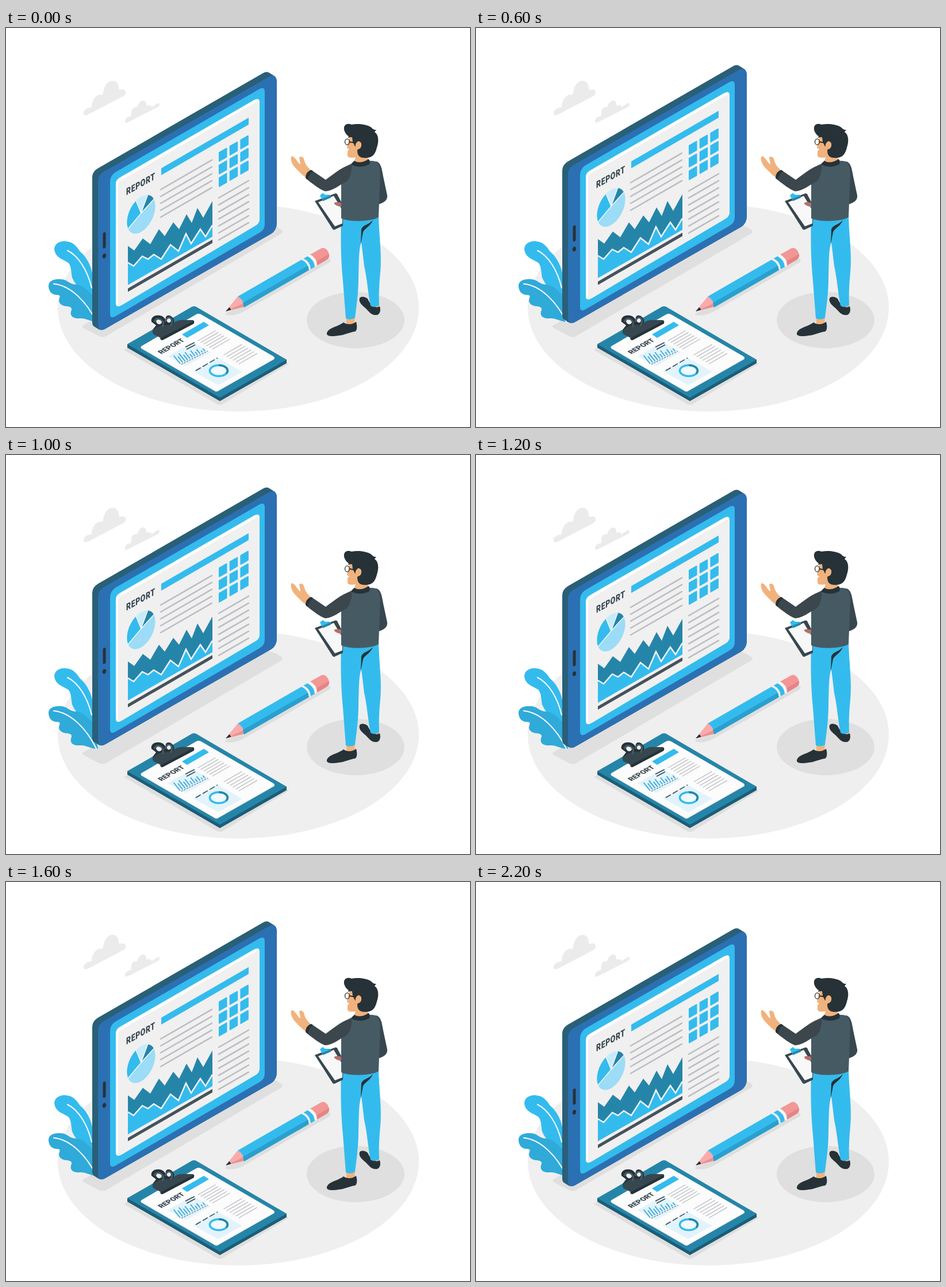
An HTML page that plays this animation: 807x694 px, repeating every 2.4 s.

```html
<!DOCTYPE html>
<html lang="en">
<head>
<meta charset="utf-8">
<title>Report</title>
<style>
html, body { margin: 0; width: 100%; height: 100%; overflow: hidden; background: #fff; }
svg { display: block; width: 807px; height: 694px; }
text { font-family: Roboto, Inter, sans-serif; font-weight: 900; fill: #37474f; }
.cyan { fill: #34bbed; }
.teal { fill: #2585a9; }
.dark { fill: #263238; }
.slate { fill: #37474f; }
.skin { fill: #f1b27d; }
.rule { fill: none; stroke: #babcc1; stroke-linecap: round; }
</style>
</head>
<body>
<svg viewBox="0 0 807 694">
  <g fill="#ebebeb">
    <path d="M137 152C133 149 135 143 141 140C145 137 148 140 149 137C149 126 157 115 165 116Q168 117 169 113C170 103 175 94 183 92C191 91 196 96 196 104Q196 109 200 107C206 106 209 109 208 114Q207 117 203 119L142 151Z"/>
    <path d="M208 165C205 161 209 155 214 154C219 154 217 151 218 147C218 141 222 137 228 138C230 130 235 126 239 126C245 127 243 133 245 135C250 133 253 135 253 138L263 131C267 129 269 133 265 137L212 164Z"/>
  </g>
  <ellipse cx="404" cy="486.500" rx="314" ry="180.500" fill="#efefef"/>
  <path d="M135 517L150 508L440 335L471 346L480 352Q483 355 478 358L174 536Q168 539 162 536L135 522Q131 519 135 517Z" fill="#dfdfdf"/>

  <path class="cyan" d="M84 384C85 375 94 370 104 371C117 372 122 379 129 389C142 400 149 416 151 432V478C139 464 122 451 115 434C113 424 114 414 108 408C98 402 85 399 84 384Z"/>
  <path d="M74 450C73 440 84 436 95 437C106 437 110 445 119 446C136 446 143 459 152 466L160 511C148 512 140 504 129 505C117 506 111 501 113 493C116 487 113 485 106 484C95 483 90 477 93 470C95 464 93 465 86 464C79 463 75 458 74 450Z" fill="#30aad9"/>
  <g fill="none" stroke="#fff" stroke-width="2" stroke-linecap="round">
    <path d="M107 387C125 396 141 419 149 452"/>
    <path d="M83 445C113 448 141 477 157 511"/>
  </g>

  <g id="tablet">
    <path d="M150 260Q150 250 160 244L447 78.500Q453 75 458 78L466 83Q471 86 471 95V338Q471 352 461 358L173 523Q167 527 161 524L153 519Q150 517 150 512Z" fill="#2a5f78"/>
    <path d="M160 266Q160 256 170 250L457 85Q471 78 471 96V338Q471 352 461 358L173 523Q160 530 160 515Z" fill="#2b70b2"/>
    <path class="cyan" d="M181 268Q181 257 190 251L440 106.500Q450 101 450 111V341Q450 351 441 356L191 501Q181 507 181 497Z"/>
    <path d="M191 271Q191 264 198 260L431 125.500Q441 120 441 129V332Q441 339 435 343L201 482Q191 488 191 478Z" fill="#fff"/>
    <path d="M195 274Q195 268 200 265L434 129.500Q441 126 441 133V332Q441 339 435 343L202 481.500Q195 485 195 479Z" fill="#f0f0f0"/>
    <rect class="dark" x="168.500" y="355" width="5" height="28" rx="2.500" transform="matrix(1 -.25 0 1 0 43)"/>
    <ellipse class="dark" cx="171" cy="396.500" rx="3" ry="4.200" transform="rotate(18 171 396.500)"/>
    <text transform="matrix(.75 -.42 0 1 209 291)" font-size="16.500" letter-spacing=".8">REPORT</text>
    <path class="cyan" d="M270 244L422 156V168L270 256Z"/>
    <clipPath id="disc"><circle r="29" transform="matrix(.85 -.49 0 1.06 235 324)"/></clipPath>
    <g clip-path="url(#disc)" stroke="#f4f8fa" stroke-width="1.200">
      <path d="M235 322L205 358L280 380V280L263 291Z" fill="#9cdcf6"/>
      <path class="cyan" d="M235 322L221 288L190 290V380L205 358Z"/>
      <path d="M235 322L221 288L246 280L249 284Z" fill="#c6ebfa"/>
      <path class="teal" d="M235 322L249 284H270L263 291Z"/>
    </g>
    <path id="notes" class="rule" stroke-width="2.500"/>
    <path id="grid" class="cyan" stroke="#34bbed" stroke-width="2" stroke-linejoin="round"/>
    <path class="teal" d="M212 379L223 387L238 366L251 376L266 350L276 362L291 338L301 350L314 324L323 339L333 313L343 330L359 301V362L212 446Z"/>
    <path class="cyan" d="M212 408L222 414L237 397L247 402L257 394L270 402L286 377L300 388L313 358L322 375L338 350L347 363L359 343V363L212 447Z"/>
    <path d="M212 408L222 414L237 397L247 402L257 394L270 402L286 377L300 388L313 358L322 375L338 350L347 363L359 343" fill="none" stroke="#f2f5f6" stroke-width="2.500"/>
    <path d="M212 453L359 368V374L212 459Z" fill="#46525c"/>
  </g>

  <g>
    <path d="M382 499Q379 496 389 493L555 399Q570 402 562 408L412 494Q396 502 382 499Z" fill="#dedede"/>
    <path d="M382 493L403 467Q414 471 414 484Z" fill="#f9abab"/>
    <path d="M382 493L413 479L414 485Z" fill="#ec8f90"/>
    <path class="dark" d="M382 493L388 486Q391 487 391 490.500Z"/>
    <path class="cyan" d="M403 467L514 403Q526 408 527 421L414 486Q414 472 403 467Z"/>
    <path d="M412 478L526 413L527 421L414 486Z" fill="#2b9fcd"/>
    <path d="M514 403L529 394Q541 400 541 413L527 421Q526 408 514 403Z" fill="#f5f5f5"/>
    <path d="M517.500 401L524.500 397Q536 403 537 415.500L530 419.500Q529 406 517.500 401Z" fill="#34bbed"/>
    <path d="M529 394L547 384Q553 380 559 387Q565 396 558 403L541 413Q541 400 529 394Z" fill="#f29795"/>
    <path d="M541 405L562 393Q563 400 558 403L541 413Z" fill="#e78483"/>
  </g>

  <g>
    <path d="M205 560L327 490L492 584L377 654Q372 657 367 654Z" fill="#dedede"/>
    <path d="M211 550L327 486L488 577V583L372 649L211 556Z" fill="#1c5d77"/>
    <path class="teal" d="M211 550L323 485Q327 483 331 485L488 577L372 643Z"/>
    <path d="M236 554L331 499Q335 497 339 499L465 572Q469 575 465 577L370 631Q366 634 362 631L236 558Q233 556 236 554Z" fill="#dedfe0"/>
    <path d="M236 553L331 498Q335 496 339 498L465 571Q469 574 465 576L370 630Q366 633 362 630L236 557Q233 555 236 553Z" fill="#fcfcfc"/>
    <text transform="matrix(.866 -.5 .866 .5 270.500 567.500)" font-size="12.500">REPORT</text>
    <path class="cyan" d="M306 533L344 511L353 517L315 539Z"/>
    <path id="memo" class="rule" stroke-width="1.300"/>
    <path d="M281 571L325 546L356 564L313 588ZM325 597L367 573L411 598L369 621Z" fill="#e2f3fb"/>
    <path id="bars" fill="none" stroke="#34a9d9" stroke-width="1.800"/>
    <path d="M305 585L351 562" fill="none" stroke="#37474f" stroke-width="1" stroke-dasharray="3 2"/>
    <path d="M312 555L328 547M314 559L329 551" stroke="#37474f" stroke-width="1.500"/>
    <path d="M330 596L368 574" stroke="#37474f" stroke-width="1.500" stroke-dasharray="10 4"/>
    <ellipse cx="370" cy="596" rx="15.500" ry="9.500" fill="#f0f9fd" stroke="#34bbed" stroke-width="3.600"/>
    <path d="M370 586.500A15.500 9.500 0 0 1 383 601" fill="none" stroke="#2585a9" stroke-width="3.600"/>
    <path class="dark" d="M256 532C253 524 259 521 261 517L253 511C251 502 260 499 267 500C275 501 276 506 278 508C276 500 283 498 288 502C294 506 293 513 290 518L269 539Z"/>
    <path class="slate" d="M257 533Q253 527 259 523Q270 514 288 517Q296 506 313 508L325 508Q330 511 325 515L274 542Q268 545 268 538Z"/>
    <path d="M270 539L327 509V514L272 543Q269 543 270 539Z" class="dark"/>
    <ellipse cx="266" cy="511" rx="5" ry="4" fill="#edf0f1" transform="rotate(25 266 511)"/>
    <ellipse cx="283" cy="508" rx="3.500" ry="4.500" fill="#edf0f1" transform="rotate(-20 283 508)"/>
    <path d="M258 511Q261 503 269 507Q276 511 272 520M277 511Q280 501 287 505Q291 510 286 518" fill="none" stroke="#455a64" stroke-width="3"/>
  </g>

  <g>
    <ellipse cx="608" cy="508" rx="85" ry="49" fill="#dfdfdf"/>
    <path class="skin" d="M592 502H607L606 516L592 518ZM633 478H649V489H636Z"/>
    <path class="dark" d="M558 531C560 521 577 520 587 512C594 517 602 516 609 511C611 518 611 526 607 528C597 529 590 534 578 535C566 537 557 536 558 531ZM615 470C617 466 625 467 629 471C634 482 642 489 650 484C652 490 651 497 646 499C636 501 632 494 625 487C619 482 613 477 615 470Z"/>
    <path class="cyan" d="M583 326H648C649 365 654 395 651 425C649 445 648 464 649 482Q641 488 634 483C629 458 628 435 623 414L618 372C613 385 614 412 613 435C613 462 609 487 607 504Q599 509 591 505L586 440C582 400 582 360 583 326Z"/>
    <path class="dark" d="M638 334C630 343 621 342 618 350L617 376L621 355C624 348 634 345 638 334Z"/>
    <path class="slate" d="M537 301L572 288Q576 287 577 291L586 308V344L571 351Q568 351 567 348Z"/>
    <path d="M543 303L570 292L585 317V340L572 345Z" fill="#f8f8f8"/>
    <path class="cyan" d="M546 291L551 287L555 290L563 290L565 295L551 301Z"/>
    <path class="teal" d="M550 297L565 291V295L551 301Z"/>
    <path d="M571 304Q577 301 586 305V311Q576 311 571 306Z" fill="#b56f68"/>
    <path class="slate" d="M642 232C652 232 654 246 656 258L663 291C664 299 658 304 646 307Z"/>
    <path d="M583 258C584 244 594 238 604 235L635 231C647 231 650 238 651 252L648 329C636 337 596 338 583 331Z" fill="#465a64"/>
    <path class="skin" d="M531 248C526 243 521 239 519 231C518 224 513 222 510 225C511 232 513 237 511 237C506 232 502 223 497 223C493 227 498 238 504 244C511 251 516 257 522 260Z"/>
    <path d="M601 238C588 239 574 251 556 264L531 247C525 248 520 257 522 262C534 272 549 283 556 284C569 283 580 273 592 267C600 261 602 243 601 238Z" fill="#3b464d"/>
    <path class="dark" d="M531 247L534 249Q526 254 525 264L521 261Q521 250 531 247Z"/>
    <path class="dark" d="M600 237C606 230 612 226 615 227C622 229 631 224 633 232L632 237C621 243 607 242 600 237Z"/>
    <path class="skin" d="M598 180L597 193C595 199 593 205 593 209L597 211L594 214V221C594 226 599 226 608 225L606 231Q615 237 629 229L630 188Z"/>
    <path class="dark" d="M589 180C585 170 592 164 601 168C611 166 625 167 634 172C637 174 639 178 644 177L641 181C648 185 649 197 645 208C642 221 636 226 625 226C616 226 611 223 611 213L613 207L607 206L603 198L602 190C596 190 591 185 589 180Z"/>
    <ellipse class="skin" cx="613" cy="204" rx="5.200" ry="7" transform="rotate(12 613 204)"/>
    <path d="M597 198L608 200" stroke="#263238" stroke-width="1.800"/>
    <ellipse cx="593.500" cy="198" rx="4" ry="5.200" fill="none" stroke="#263238" stroke-width="1.300"/>
    <path d="M595 190L600 189" stroke="#263238" stroke-width="1.600"/>
  </g>
</svg>
<script>
const get = id => document.getElementById(id);
const SLOPE = .577;

// A run of parallel strokes, each shifted by (sx, sy)
const strokes = (n, x, y, sx, sy, w) => Array.from({ length: n }, (_, i) =>
  `M${x + i * sx} ${y + i * sy}l${w} ${-w * SLOPE}`).join('');

get('notes').setAttribute('d',
  strokes(5, 269, 281, 0, 12, 89) + strokes(7, 370, 295.500, 0, 12.200, 52));
get('memo').setAttribute('d',
  strokes(6, 334, 544, 5, 2.900, 30) + strokes(6, 379, 568.500, 5.300, 3.100, 31));

let tiles = '';
for (let col = 0; col < 3; col++)
  for (let row = 0; row < 3; row++)
    tiles += `M${371 + col * 18.700} ${216.500 - col * 10.800 + row * 22}l12.500 -7.200v15l-12.500 7.200z`;
get('grid').setAttribute('d', tiles);

get('bars').setAttribute('d', [19, 14, 18, 12, 15, 8, 13, 7, 10, 4, 6].map((h, i) =>
  `M${303 + i * 4.300} ${584 - i * 2.200}l${-h * .6} ${-h * .75}`).join(''));

// The tablet bobs in twelve held steps of 200 ms
function draw(now) {
  const step = Math.floor(now % 2400 / 200);
  get('tablet').setAttribute('transform', `translate(0 ${4 * Math.abs(step - 5) - 20})`);
  requestAnimationFrame(draw);
}
draw(performance.now());
</script>
</body>
</html>
```
